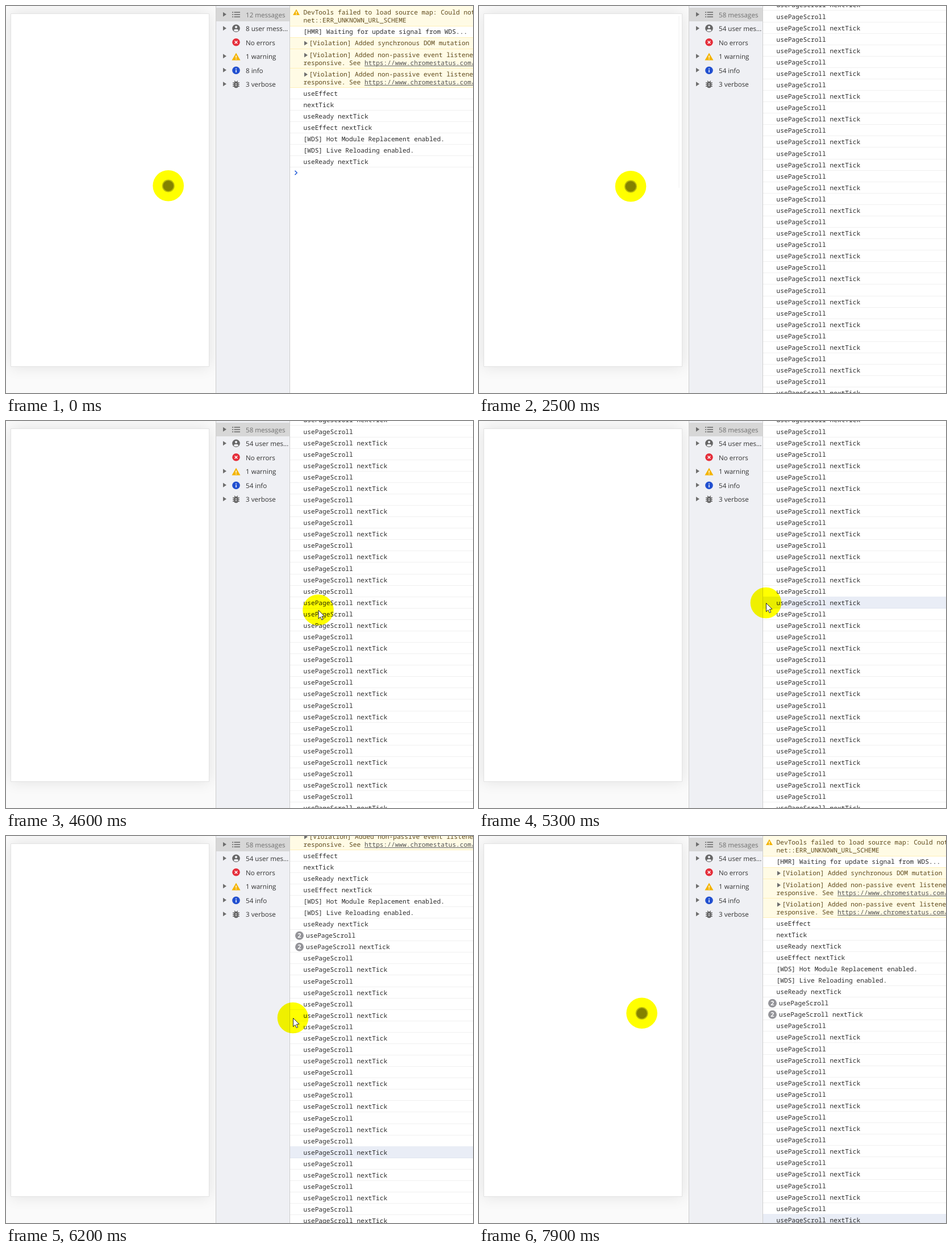
Write an HTML page with a canvas that moves like this. It is 822 px wide and 681 px high and loops after 8 s.

```html
<!DOCTYPE html>
<html lang="en">
<head>
<meta charset="utf-8">
<title>Console scroll log</title>
<style>
  html, body { margin: 0; width: 100%; height: 100%; overflow: hidden; background: #fafafa; }
  canvas { display: block; }
</style>
</head>
<body>
<canvas id="stage" width="822" height="681"></canvas>
<script>
const ctx = document.getElementById('stage').getContext('2d');
const W = 822, H = 681, LOOP = 8000, STEP = 100;
const MONO = '11.2px "Noto Sans Mono", "DejaVu Sans Mono", monospace';
const SANS = '11.6px "Open Sans", "Noto Sans", sans-serif';
const INK = '#2b2b2b';
const PITCH = 20.083, FIRST = 157.6, MAX_ROWS = 44, MAX_SCROLL = 356;
const INTRO = ['useEffect', 'nextTick', 'useReady nextTick', 'useEffect nextTick',
  '[WDS] Hot Module Replacement enabled.', '[WDS] Live Reloading enabled.', 'useReady nextTick'];
const HOVERED = INTRO.length + 19;

// time, x, y
const PATH = [
  [0, 285.7, 316.2], [100, 285.7, 314], [200, 285.7, 320], [400, 285.7, 320],
  [500, 281, 323], [600, 272, 313], [700, 267, 317.2], [3800, 267, 317.2],
  [3900, 269.7, 317.2], [4100, 312, 311], [4300, 430, 325], [4500, 535, 334], [4700, 564, 331],
  [4800, 543, 330], [5000, 480, 325], [5100, 477, 322], [5300, 505, 320],
  [7000, 505, 320], [7100, 490, 322], [7400, 345, 328], [7600, 284, 314], [7700, 299, 315],
  [7800, 299, 315], [7900, 286.6, 311.7], [8000, 286.6, 311.7]
];

const clamp = (v, a = 0, b = 1) => Math.min(b, Math.max(a, v));
const ramp = (t, a, b) => clamp((t - a) / (b - a));
const easeOut = p => 1 - (1 - p) * (1 - p);
const baseline = i => Math.round(FIRST + i * PITCH);

function pointerAt(t) {
  let i = 1;
  while (i < PATH.length - 1 && PATH[i][0] < t) i++;
  const a = PATH[i - 1], b = PATH[i], p = ramp(t, a[0], b[0]);
  return [a[1] + (b[1] - a[1]) * p, a[2] + (b[2] - a[2]) * p];
}

function rect(x, y, w, h, color) {
  ctx.fillStyle = color;
  ctx.fillRect(x, y, w, h);
}

function disc(x, y, r, color) {
  ctx.fillStyle = color;
  ctx.beginPath();
  ctx.arc(x, y, r, 0, 2 * Math.PI);
  ctx.fill();
}

function poly(points, color) {
  ctx.fillStyle = color;
  ctx.beginPath();
  points.forEach(([x, y]) => ctx.lineTo(x, y));
  ctx.closePath();
  ctx.fill();
}

function strokes(color, width, ...lines) {
  ctx.strokeStyle = color;
  ctx.lineWidth = width;
  ctx.beginPath();
  for (const [start, ...rest] of lines) {
    ctx.moveTo(...start);
    rest.forEach(p => ctx.lineTo(...p));
  }
  ctx.stroke();
}

function text(str, x, y, color, font = MONO) {
  ctx.font = font;
  ctx.fillStyle = color;
  ctx.fillText(str, x, Math.round(y));
}

const arrow = (x, y) => poly([[x, y - 4], [x + 6, y], [x, y + 4]], '#6e6e6e');

function warning(x, y, s) {
  poly([[x, y - s], [x + s * 1.1, y + s * .9], [x - s * 1.1, y + s * .9]], '#f4b400');
  rect(x - .75, y - s * .3, 1.5, s * .6, '#fff');
  rect(x - .75, y + s * .48, 1.5, 1.4, '#fff');
}

function phone(t) {
  rect(0, 0, 370, H, '#fafafa');
  ctx.save();
  ctx.shadowColor = 'rgba(0,0,0,.1)';
  ctx.shadowBlur = 24;
  rect(8, 13, 350, 622, '#fff');
  ctx.restore();
  ctx.strokeStyle = '#e2e2e2';
  ctx.lineWidth = 1;
  ctx.strokeRect(8.5, 13.5, 349, 621);

  if (t < 1100 || t >= 3900) return;
  const down = easeOut(ramp(t, 1000, 1300)) - easeOut(ramp(t, 1600, 2000));
  ctx.globalAlpha = 1 - .9 * ramp(t, 2100, 2500);
  ctx.fillStyle = '#c1c1c1';
  ctx.beginPath();
  ctx.roundRect(350.5, 17 + 45 * down, 3, 303, 1.5);
  ctx.fill();
  ctx.globalAlpha = 1;
}

const ICONS = [
  y => {
    for (const dy of [-4, 0, 4]) {
      rect(398, y + dy - 1, 2, 1.6, '#6e6e6e');
      rect(401.5, y + dy - 1, 10.5, 1.6, '#6e6e6e');
    }
  },
  y => {
    disc(405, y - .5, 6.8, '#666');
    disc(405, y - 2.7, 2.1, '#eff0f4');
    ctx.beginPath();
    ctx.ellipse(405, y + 2.9, 4, 2, 0, 0, 2 * Math.PI);
    ctx.fill();
  },
  y => {
    disc(405, y - .5, 6.8, '#e52e3a');
    strokes('#fff', 1.4, [[402.6, y - 2.9], [407.4, y + 1.9]], [[407.4, y - 2.9], [402.6, y + 1.9]]);
  },
  y => warning(405, y + .5, 6.8),
  y => {
    disc(405, y, 6.8, '#2250d0');
    rect(404.2, y - 3.6, 1.6, 1.6, '#fff');
    rect(404.2, y - .8, 1.6, 4.3, '#fff');
  },
  y => {
    for (const dy of [-3, 0, 3]) rect(399, y + dy - .2, 12, 1.4, '#666');
    strokes('#666', 1.3, [[402, y - 6], [404, y - 4]], [[408, y - 6], [406, y - 4]]);
    ctx.fillStyle = '#666';
    ctx.beginPath();
    ctx.roundRect(401, y - 4.8, 8, 11.3, 4);
    ctx.fill();
    rect(403.5, y - 1.3, 3, 1.2, '#eff0f4');
    rect(403.5, y + 1.7, 3, 1.2, '#eff0f4');
  }
];

function sidebar(t, rows) {
  rect(370, 0, 129, H, '#eff0f4');
  rect(370, 3, 129, 24, '#d7d7d7');
  rect(369, 0, 1, H, '#cdcdcd');
  rect(499, 0, 1, H, '#cdcdcd');

  // The counters run ahead of the rows already painted.
  const logged = rows && Math.min(t < 1700 ? 20 : MAX_ROWS, rows + 8);
  const extra = logged + Math.min(2, logged);
  const user = 8 + extra;
  const labels = [`${12 + extra} messages`, `${user} user mes${user < 10 ? 's' : ''}...`,
    'No errors', '1 warning', `${user} info`, '3 verbose'];
  const redrawing = t >= 1100 && t < 1500;
  labels.forEach((label, i) => {
    const y = 15.3 + i * 24.5;
    if (i !== 2) arrow(382, y - .5);
    if (!(redrawing && [0, 1, 4].includes(i))) ICONS[i](y);
    text(label, 422, y + 4.4, i ? '#333' : '#707070', SANS);
  });
}

function notices() {
  const brown = '#5f4a1c', cream = '#fffbe5', edge = '#fff0b8';
  rect(500, 0, 322, 35, cream);
  rect(500, 56, 322, 87, cream);
  for (const y of [35, 55, 75, 109, 143]) rect(500, y, 322, 1, edge);

  warning(511, 11.2, 5.4);
  text('DevTools failed to load source map: Could not load content', 523.5, 15, brown);
  text('net::ERR_UNKNOWN_URL_SCHEME', 523.5, 29, brown);
  text('[HMR] Waiting for update signal from WDS...', 523.5, 49, INK);

  arrow(525, 65.5);
  text('[Violation] Added synchronous DOM mutation listener', 533.5, 69, brown);
  for (const y of [90, 124]) {
    arrow(525, y - 3.5);
    text('[Violation] Added non-passive event listener to', 533.5, y, brown);
    text('responsive. See ', 523.5, y + 14, brown);
    text('https://www.chromestatus.com/feature', 631, y + 14, '#555');
    rect(631, y + 15, 191, 1, '#666');
  }
}

function logRow(i, y, hover) {
  const k = i - INTRO.length;
  if (hover) rect(500, y - 15, 322, 20, '#e9edf6');
  rect(500, y + 5, 322, 1, hover ? '#dfe5f0' : '#f0f0f0');
  const grouped = k === 0 || k === 1;
  const label = k < 0 ? INTRO[i] : 'usePageScroll' + (k % 2 ? ' nextTick' : '');
  if (grouped) {
    disc(516.5, y - 3.8, 7.5, '#949499');
    text('2', 513.3, y, '#fff', 'bold 11px "Open Sans", sans-serif');
  }
  text(label, grouped ? 528 : 523.5, y, INK);
}

function consolePane(t, rows, scroll) {
  rect(500, 0, 322, H, '#fff');
  ctx.save();
  ctx.translate(0, -scroll);
  notices();
  const count = INTRO.length + rows;
  for (let i = 0; i < count; i++) {
    const y = baseline(i);
    if (y > scroll - 20 && y < scroll + H + 20) {
      const hover = t >= 5100 ? i === HOVERED : t >= 4800 && i === HOVERED + 1;
      logRow(i, y, hover);
    }
  }
  const y = baseline(count) - 4.5;
  strokes('#2a62d9', 1.6, [[508.5, y - 3.6], [512.3, y], [508.5, y + 3.6]]);
  ctx.restore();
}

function pointer(t) {
  const [x, y] = pointerAt(t);
  ctx.globalCompositeOperation = 'multiply';
  disc(x, y, 27.3, '#ff0');
  ctx.globalCompositeOperation = 'source-over';
  if (x < 358) {
    disc(x, y + .3, 11, '#b9b80a');
    disc(x, y + .3, 9.2, '#838200');
    return;
  }
  const shape = [[0, 0], [0, 15], [3.4, 11.8], [5.8, 17], [8.2, 16], [5.9, 10.8], [10.6, 10.5]]
    .map(([dx, dy]) => [x + .5 + dx, y + .5 + dy]);
  poly(shape, '#fff');
  strokes('#222', 1, [...shape, shape[0]]);
}

function draw(t) {
  const rows = Math.round(20 * ramp(t, 1000, 1500) + 24 * ramp(t, 1600, 2500));
  const scroll = t < 5600
    ? Math.max(0, Math.round(MAX_SCROLL - (MAX_ROWS - rows) * PITCH))
    : Math.round(MAX_SCROLL * (1 - ramp(t, 5600, 6500)));
  phone(t);
  consolePane(t, rows, scroll);
  sidebar(t, rows);
  pointer(t);
}

ctx.textRendering = 'geometricPrecision';
ctx.lineJoin = 'round';
const start = performance.now();
function tick() {
  const t = (performance.now() - start) % LOOP;
  draw(Math.floor(t / STEP) * STEP);
  requestAnimationFrame(tick);
}
tick();
</script>
</body>
</html>
```
